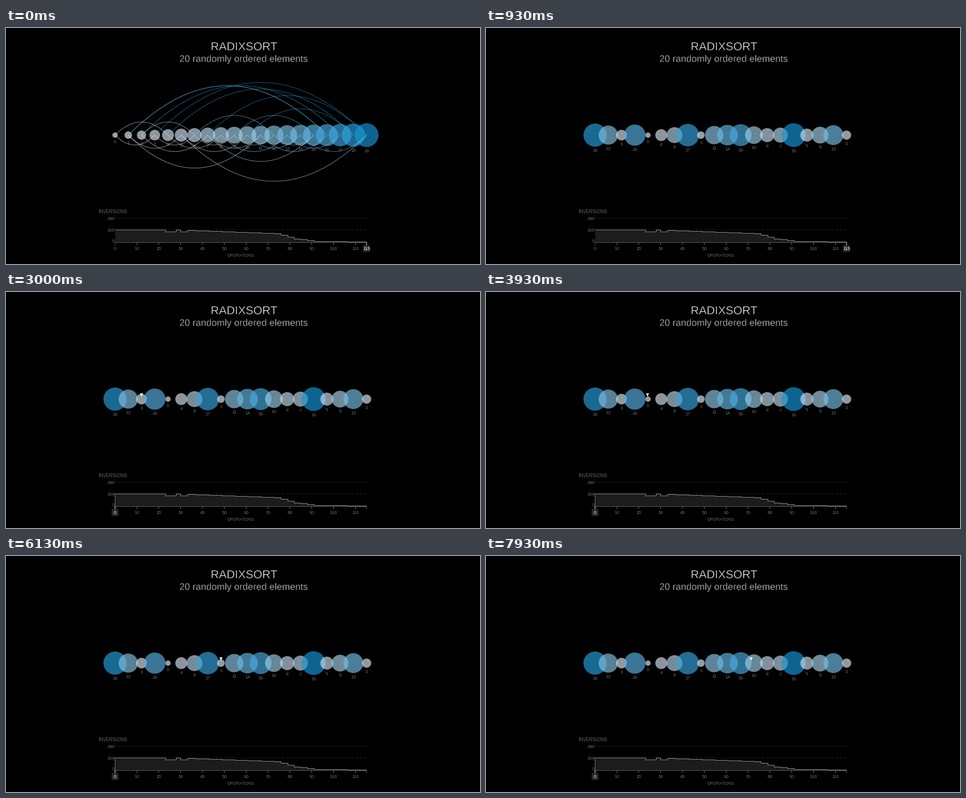
Animation of 976 by 488 pixels, one loop 8 s. Source, as a matplotlib script:

```python
import numpy as np
import matplotlib.pyplot as plt
from matplotlib import patheffects as pe
from matplotlib.animation import FuncAnimation
from matplotlib.patches import Circle, FancyBboxPatch, PathPatch, Polygon
from matplotlib.path import Path

W, H, DPI = 976, 488, 100
LOOP, STEP_MS = 8000, 40
PX = 72 / DPI  # points per pixel

ORDER = [18, 12, 3, 15, 0, 4, 8, 17, 1, 11, 14, 16, 10, 6, 7, 19, 5, 9, 13, 2]
COUNT, OPS = len(ORDER), 115
X0, X1, CY = 224.5, 742.5, 221.5
BASE, CHART_H = 443.5, 50
PAIRS = COUNT * (COUNT - 1) // 2
INVERSIONS = sum(a > b for i, a in enumerate(ORDER) for b in ORDER[i:])

SHUFFLE, RESET, WALK = 467, 977, 1487
PERIOD, MOVE = 510, 500

GREY, LIGHT, DEEP = "#707070", np.array([228, 232, 238]), np.array([22, 150, 216])


def clamp(u):
    return min(max(u, 0), 1)


def ease(u):
    u = clamp(u)
    return 4 * u ** 3 if u < 0.5 else 1 - 4 * (1 - u) ** 3


def slot_x(i):
    return X0 + (X1 - X0) * i / (COUNT - 1)


def op_x(op):
    return np.floor(X0 + (X1 - X0) * op / OPS) + 0.5


def chart_y(inversions):
    return np.floor(BASE - CHART_H * inversions / PAIRS) + 0.5


def tint(n):
    f = (n / (COUNT - 1)) ** 1.6
    return tuple((LIGHT + (DEEP - LIGHT) * f) / 255)


fig = plt.figure(figsize=(W / DPI, H / DPI), dpi=DPI, facecolor="black")
ax = fig.add_axes([0, 0, 1, 1])
ax.set_xlim(0, W)
ax.set_ylim(H, 0)
ax.axis("off")


def text(x, y, s, px, color=GREY, ha="center", z=3):
    return ax.text(x, y, s, fontsize=px * PX, color=color, ha=ha,
                   va="baseline", family="Liberation Sans", zorder=z)


def line(xs, ys, color, z=2, **kw):
    return ax.plot(xs, ys, color=color, lw=PX, zorder=z, snap=False,
                   solid_capstyle="butt", solid_joinstyle="miter",
                   dash_capstyle="butt", **kw)[0]


def thin(label, width):
    label.set_path_effects([pe.Normal(), pe.Stroke(linewidth=width * PX,
                                                   foreground="black")])


# headings
thin(text(490, 46, "RADIXSORT", 23.6, "white"), 0.7)
thin(text(490, 70, "20 randomly ordered elements", 19.5, "#cacace"), 0.5)

# inversions chart
text(190.5, 382.7, "INVERSIONS", 9.7, "#666666", ha="left")
text(483.5, 472.7, "OPERATIONS", 8.7, "#666666")
for value in (PAIRS, 100, 0):
    y = chart_y(value)
    text(223.5, y + (3.2 if value else -0.8), str(value), 9.2, ha="right")
    if value:
        line([X0, X1], [y, y], "#2a2a2a", z=1, dashes=(4, 4))


def inversions_at(op):
    """A brief dip, then a slow slope and a steep end, held for three steps."""
    if op in range(23, 28) or op in range(30, 33):
        return 84
    held = op - (op - 1) % 3
    return np.interp(held, [24, 34, 64, 73, 82, 91, 112],
                     [INVERSIONS - 1, 95, 75, 69, 28, 8, 4])


ops = np.arange(OPS)
xs = np.repeat(op_x(np.arange(OPS + 1)), 2)[1:-1]
ys = np.repeat(chart_y(np.array([inversions_at(op) for op in ops])), 2)
ax.fill_between(xs, ys, BASE, color="#1c1c1d", lw=0, zorder=1.5)
line(xs, ys, "#9c9a98", z=2.5)
line([X0, X1], [BASE, BASE], "#606060")

axis_labels = {}
for op in [*range(0, OPS, 10), OPS]:
    line([op_x(op)] * 2, [BASE, 449], GREY)
    if op < OPS:
        axis_labels[op] = text(op_x(op), 459, str(op), 9.2)


def cursor(op):
    x = op_x(op)
    box = FancyBboxPatch((x - 5.5, 450), 11, 11.5, boxstyle="round,pad=1.5",
                         fc="#2a2a2a", ec="none", zorder=3)
    ax.add_patch(box)
    return [box, line([x, x], [BASE, 449], "white", z=4),
            line([x, x], [chart_y(inversions_at(op)), BASE], "white", z=4,
                 dashes=(2, 2)),
            text(x, 459, str(op), 9.2, "white", z=5)]


end_cursor, start_cursor = cursor(OPS), cursor(0)

# elements, stacked in their shuffled order
balls = []
for i, n in enumerate(ORDER):
    r = np.sqrt(30 * (n + 1))
    ball = Circle((slot_x(n), CY), r, fc=tint(n), ec="none", alpha=0.67,
                  zorder=10 + i)
    ax.add_patch(ball)
    tag = text(slot_x(n), CY + r + 10.6, str(n), 9.2, z=10.5 + i)
    balls.append((i, n, ball, tag))


def arc(start, end):
    """Rightward moves curve above the row, leftward moves below it."""
    xa, xb = slot_x(start), slot_x(end)
    path = Path([(xa, CY), ((xa + xb) / 2, CY - (xb - xa) / 2), (xb, CY)],
                [Path.MOVETO, Path.CURVE3, Path.CURVE3])
    patch = PathPatch(path, fc="none", ec=tint(end), lw=0.9 * PX, zorder=40)
    ax.add_patch(patch)
    return patch


far_moves = [(1, 16), (1, 16), (2, 17), (3, 19), (4, 18), (7, 19), (10, 18),
             (19, 5), (11, 1), (15, 7)]
near_up = [(i, i + 4 + 2 * (i > 4)) for i in (0, 2, 6, 9)]
near_down = [(i + 3 + i % 3, i) for i in range(COUNT - 5)]
arcs = [arc(a, b) for a, b in far_moves + near_up + near_down]

pointer = Polygon([(0, 0)] * 3, fc="white", ec="none", zorder=50)
ax.add_patch(pointer)


def draw(frame):
    t = frame * STEP_MS
    k = ease((t - SHUFFLE) / 470)
    for i, n, ball, tag in balls:
        x = slot_x(n + (i - n) * k)
        ball.center = (x, CY)
        tag.set_x(x)

    fade = 1 - clamp((t - SHUFFLE) / 250)
    for a in arcs:
        a.set_visible(fade > 0)
        a.set_alpha(0.72 * fade)

    rewound = t >= RESET
    for part in end_cursor:
        part.set_visible(not rewound)
    for part in start_cursor:
        part.set_visible(rewound)
    axis_labels[0].set_visible(not rewound)

    step, rest = divmod(max(t - WALK, 0), PERIOD)
    x = slot_x(step - 1 + ease(rest / MOVE))
    pointer.set_xy([(x - 3.2, 209.5), (x + 3.2, 209.5), (x, 216.5)])
    pointer.set_alpha(clamp((t - RESET) / MOVE))
    return []


anim = FuncAnimation(fig, draw, frames=LOOP // STEP_MS, interval=STEP_MS,
                     init_func=lambda: draw(0), repeat=True, repeat_delay=0,
                     blit=False)
plt.show()
```
